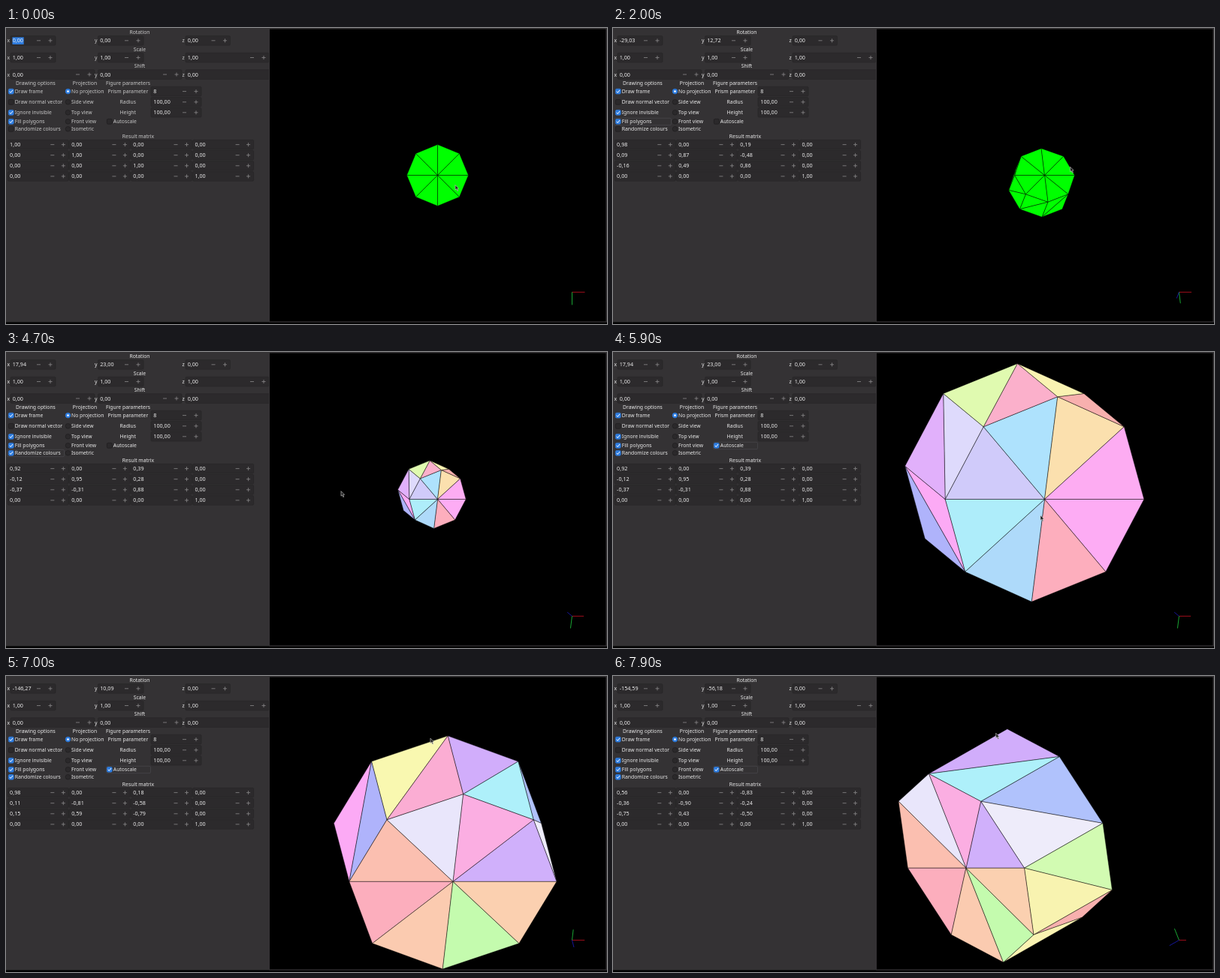
An HTML page with a canvas for the animation above (8000 ms loop, 800x395 px).

```html
<!DOCTYPE html>
<html lang="en">
<head>
<meta charset="utf-8">
<title>Prism viewer</title>
<style>
  html, body { margin: 0; height: 100%; overflow: hidden; background: #000; }
  canvas { display: block; }
</style>
</head>
<body>
<canvas id="stage" width="800" height="395"></canvas>
<script>
const ctx = document.getElementById('stage').getContext('2d');
const LOOP = 8000, STEP = 100, LAG = 30;
const FOCUS = 500, RECOLOUR = 4000, AUTOSCALE = 5100;
const CENTRE = { x: 574.5, y: 196.5 }, FIT = 194.5, SMALL = 41, SIDES = 8;
const BLUE = '#2f7de0', ENTRY = '#2c2a2c', MUTED = '#8b898b';

// time, x angle, y angle, and their speeds per 100 ms
const TURNS = [
  [1000, 0, 0, 0, 0], [2000, -29.03, 12.72, 0.6, 6.5], [2900, 17.94, 23, 0, 0],
  [5900, 17.94, 23, 0, 0], [6600, -80.19, 17.21, -15.6, -2.8],
  [7000, -146.27, 10.09, -6.8, -1], [7870, -154.59, -56.18, 0, 0],
];
// pointer path between the two drags
const PATH = [
  [2900, 617, 224], [3200, 86, 152], [3700, 20, 128], [3900, 7, 132], [4050, 8, 133],
  [4600, 600, 217], [4900, 138, 123], [5100, 138, 124], [5900, 569, 218],
];
// per side: front triangle, two wall triangles, back triangle
const COLOURS = [
  'fdacf4 b0c2fc eeecfa d0b0fb', 'fdaebd d1adfb aef0fa fbaee2',
  'aedafa f9f8b0 fbadd3 e9e6fb', 'aeedfa fcaaf5 afb3fb fbbfb0',
  'd0cbfa dedafc e1b0fb fcaebd', 'aee2fd fbb0cb e0fab0 fbcbb0',
  'fbe0ae f8b0ae faf3b2 c4fbae', 'fdacf2 d2fbb2 f8f3b0 fbd0b0',
].map(row => row.split(' ').map(hex => '#' + hex));

const clamp = v => Math.max(0, Math.min(1, v));

function segment(keys, t) {
  let i = 0;
  while (i < keys.length - 2 && t >= keys[i + 1][0]) i++;
  const [a, b] = [keys[i], keys[i + 1]];
  return [a, b, clamp((t - a[0]) / (b[0] - a[0]))];
}

function anglesAt(t) {
  const [a, b, s] = segment(TURNS, t), steps = (b[0] - a[0]) / 100;
  const ease = s * s * (3 - 2 * s);
  return [1, 2].map(k => a[k] + (b[k] - a[k]) * ease +
    steps * s * (1 - s) * (a[k + 2] * (1 - s) - b[k + 2] * s));
}

function pointerAt(t) {
  const [rx, ry] = anglesAt(t);
  if (t < 2900) return [598 + ry / 1.2, 209.5 + rx / 1.2];
  if (t > 5900) return [556.5 + ry / 1.2, 205 + rx / 1.2];
  const [a, b, s] = segment(PATH, t);
  return [a[1] + (b[1] - a[1]) * s, a[2] + (b[2] - a[2]) * s];
}

function rotation([rx, ry]) {
  const [a, b] = [rx, ry].map(v => v * Math.PI / 180);
  const sx = Math.sin(a), cx = Math.cos(a), sy = Math.sin(b), cy = Math.cos(b);
  return [[cy, 0, sy], [-sx * sy, cx, sx * cy], [-sy * cx, -sx, cx * cy]];
}

const number = v => (Math.round(v * 100) / 100 + 0).toFixed(2).replace('.', ',');

function text(str, x, y, { size = 6.8, align = 'left', fill = '#ececec' } = {}) {
  ctx.font = `${size}px "Noto Sans", sans-serif`;
  ctx.textAlign = align;
  ctx.textBaseline = 'alphabetic';
  ctx.fillStyle = fill;
  ctx.fillText(str, x, y + 2.5);
}

function line(x1, y1, x2, y2, colour, width = 0.8) {
  ctx.strokeStyle = colour;
  ctx.lineWidth = width;
  ctx.beginPath();
  ctx.moveTo(x1, y1);
  ctx.lineTo(x2, y2);
  ctx.stroke();
}

function box(x, y, w, h, fill, stroke, radius = 1.5) {
  ctx.beginPath();
  ctx.roundRect(x, y, w, h, radius);
  if (fill) { ctx.fillStyle = fill; ctx.fill(); }
  if (stroke) { ctx.strokeStyle = stroke; ctx.lineWidth = 0.7; ctx.stroke(); }
}

function spinner(value, left, right, y, textX, gap = 15.5) {
  box(left, y - 6.3, right - left, 12.6, ENTRY, '#282628');
  text(value, textX, y, { size: 7.2 });
  const plus = right - 7, minus = plus - gap;
  if (plus > 345) return;
  line(minus - 2.5, y, minus + 2.5, y, MUTED);
  line(plus - 2.5, y, plus + 2.5, y, MUTED);
  line(plus, y - 2.5, plus, y + 2.5, MUTED);
}

function check(label, x, y, on, fill) {
  box(x - 3.4, y - 3.4, 6.8, 6.8, on ? BLUE : '#2b292b', on ? BLUE : '#1f1d1f');
  if (on) {
    line(x - 2, y, x - 0.5, y + 1.7, '#fff', 1);
    line(x - 0.5, y + 1.7, x + 2.2, y - 1.8, '#fff', 1);
  }
  text(label, x + 5, y, { fill });
}

function radio(label, y, on, fill) {
  box(79.2, y - 3.3, 6.6, 6.6, on ? BLUE : '#2b292b', on ? BLUE : '#1f1d1f', 3.3);
  if (on) box(81.2, y - 1.3, 2.6, 2.6, '#fff', null, 1.3);
  text(label, 87, y, { fill });
}

function panel(t) {
  const tone = Math.round(200 + 34 * clamp((t - FOCUS + 100) / 400));
  const fill = `rgb(${tone},${tone},${tone})`;
  const heading = (str, x, y) => text(str, x, y, { align: 'center', fill });
  const [rx, ry] = anglesAt(t);

  heading('Rotation', 178, 5.7);
  heading('Scale', 178, 28.3);
  heading('Shift', 178, 50.5);
  const rows = [
    [16.8, [number(rx), number(ry), '0,00'], [66, 183, 298.5]],
    [39.5, ['1,00', '1,00', '1,00'], [66, 183, 350]],
    [62, ['0,00', '0,00', '0,00'], [118, 234, 360]],
  ];
  for (const [y, values, ends] of rows) {
    values.forEach((value, i) => {
      const left = [6, 122.5, 239][i];
      spinner(value, left, ends[i], y, left + 2.7);
      text('xyz'[i], left - 4.5, y, { fill });
    });
  }
  if (t < FOCUS) {
    box(8.5, 12.3, 15.2, 9.6, BLUE, null, 0);
    text('0,00', 8.7, 16.8, { size: 7.2 });
  }

  heading('Drawing options', 39.5, 73);
  heading('Projection', 105, 73);
  heading('Figure parameters', 162.5, 73);
  const ys = [84.6, 98.8, 112.8, 124.8, 134.8];
  const options = ['Draw frame', 'Draw normal vector', 'Ignore invisible', 'Fill polygons', 'Randomize colours'];
  options.forEach((label, i) => check(label, 6.8, ys[i], i === 4 ? t >= RECOLOUR : i !== 1, fill));
  ['No projection', 'Side view', 'Top view', 'Front view', 'Isometric']
    .forEach((label, i) => radio(label, ys[i], i === 0, fill));
  [['Prism parameter', '8'], ['Radius', '100,00'], ['Height', '100,00']].forEach(([label, value], i) => {
    heading(label, 162.3, ys[i]);
    spinner(value, 193, 260, ys[i], 196.3);
  });
  check('Autoscale', 137.8, 124.8, t >= AUTOSCALE, fill);

  const outline = (x, y, w) => box(x, y, w, 9.4, null, '#4a484c');
  if (t >= AUTOSCALE) outline(133.5, 120.3, 59);
  else if (t >= RECOLOUR) outline(1.5, 130.3, 76);
  else if (t >= FOCUS) outline(1.5, 120.3, 76);

  heading('Result matrix', 176, 144);
  const m = rotation(anglesAt(t - LAG));
  for (let r = 0; r < 4; r++) {
    for (let c = 0; c < 4; c++) {
      const value = r < 3 && c < 3 ? m[r][c] : +(r === c);
      const left = 2.3 + c * 82.1;
      spinner(number(value), left, left + 81, 155.6 + r * 14.1, left + 2.8, 14.5);
    }
  }
}

function prism(t) {
  const m = rotation(anglesAt(t));
  const project = (x, y, z) => [0, 1, 2].map(k => x * m[0][k] + y * m[1][k] + z * m[2][k]);
  const ring = z => Array.from({ length: SIDES }, (_, i) => {
    const a = i * 2 * Math.PI / SIDES;
    return project(Math.cos(a), Math.sin(a), z);
  });
  const front = ring(0), back = ring(1);
  const extent = Math.max(...[...front, ...back].flat().map(Math.abs));
  const size = t >= AUTOSCALE ? FIT / extent : SMALL;
  const near = project(0, 0, 0), far = project(0, 0, 1);

  // neighbouring faces share an edge, so each one strokes it thinly
  ctx.lineWidth = 0.45;
  ctx.lineJoin = 'round';
  ctx.strokeStyle = '#000';
  for (let i = 0; i < SIDES; i++) {
    const j = (i + 1) % SIDES;
    const faces = [
      [near, front[i], front[j]], [front[j], front[i], back[j]],
      [front[i], back[i], back[j]], [far, back[j], back[i]],
    ];
    faces.forEach(([a, b, c], k) => {
      const facing = (b[0] - a[0]) * (c[1] - a[1]) - (b[1] - a[1]) * (c[0] - a[0]);
      if (facing < 1e-4) return;
      ctx.beginPath();
      for (const p of [a, b, c]) ctx.lineTo(CENTRE.x + p[0] * size, CENTRE.y + p[1] * size);
      ctx.closePath();
      ctx.fillStyle = t >= RECOLOUR ? COLOURS[i][k] : '#0f0';
      ctx.fill();
      ctx.stroke();
    });
  }

  ['#c01020', '#20d040', '#1c1cc0'].forEach((colour, k) =>
    line(753.5, 352.5, 753.5 + m[k][0] * 17, 352.5 + m[k][1] * 17, colour));
}

function pointer(t) {
  const [x, y] = pointerAt(t);
  if (x > 85 && x < 130 && y > 150 && y < 205) {
    line(x, y, x, y + 7, '#fff');
    line(x - 1.5, y, x + 1.5, y, '#fff');
    line(x - 1.5, y + 7, x + 1.5, y + 7, '#fff');
    return;
  }
  ctx.beginPath();
  for (const [dx, dy] of [[0, 0], [0, 6.5], [1.5, 5.2], [2.8, 8], [3.8, 7.5], [2.7, 4.9], [4.6, 4.7]])
    ctx.lineTo(x + dx, y + dy);
  ctx.closePath();
  ctx.fillStyle = '#1c1c1c';
  ctx.fill();
  ctx.strokeStyle = '#d4d4d4';
  ctx.lineWidth = 0.6;
  ctx.stroke();
}

function draw(now) {
  const t = Math.floor(now % LOOP / STEP) * STEP;
  ctx.fillStyle = '#000';
  ctx.fillRect(0, 0, 800, 395);
  ctx.fillStyle = '#343234';
  ctx.fillRect(0, 0, 800, 392.5);
  panel(t);
  ctx.fillStyle = '#343234';
  ctx.fillRect(350, 0, 450, 392.5);
  ctx.fillStyle = '#000';
  ctx.fillRect(351, 1.5, 447.5, 390);
  prism(t);
  pointer(t);
}

const start = performance.now();
function tick() {
  draw(performance.now() - start);
  requestAnimationFrame(tick);
}
tick();
</script>
</body>
</html>
```
